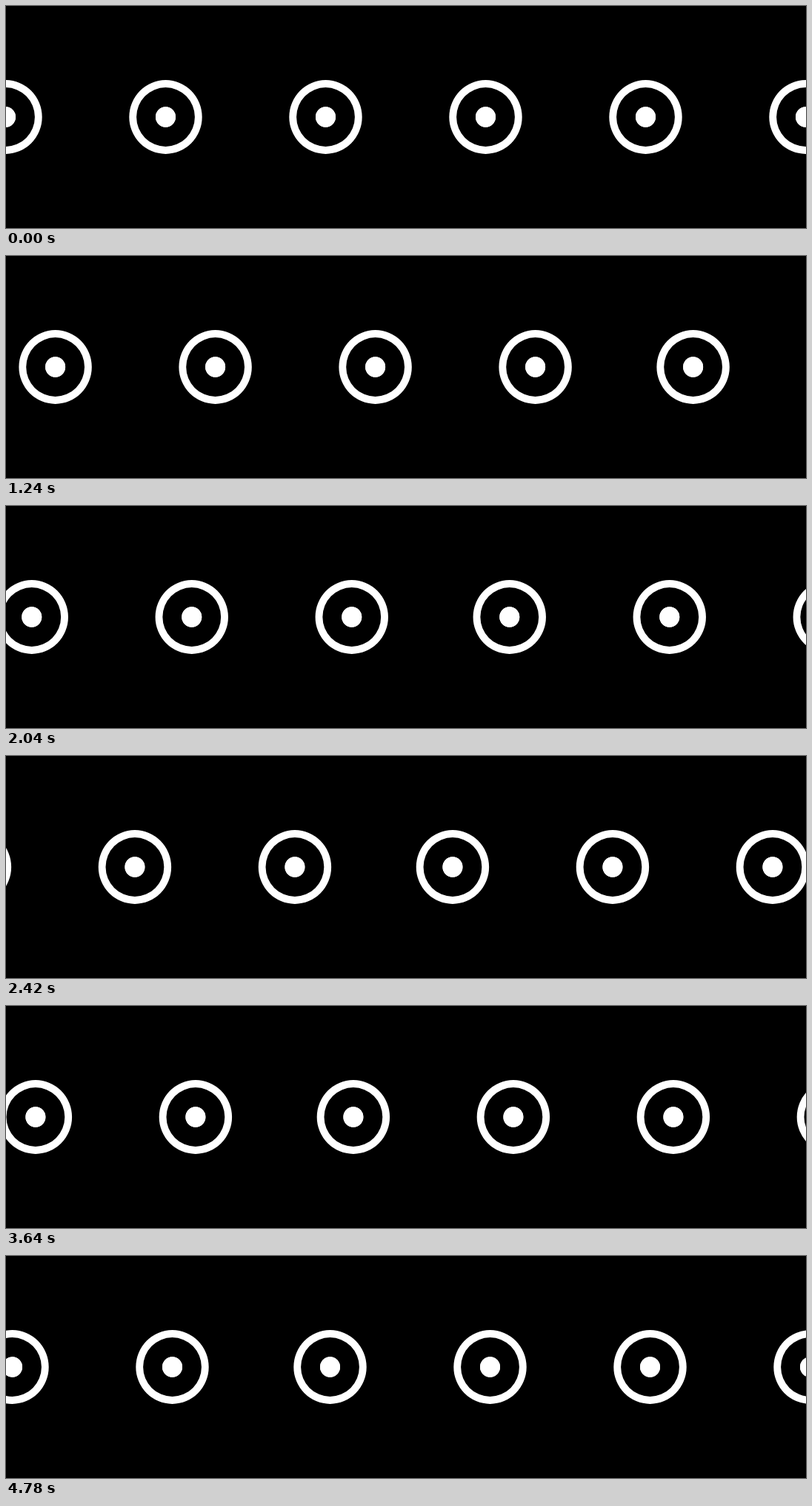
An HTML page with a canvas for the animation above (5440 ms loop, 1080 px wide and 300 px high).

```html
<!DOCTYPE html>
<html lang="en">
<head>
<meta charset="utf-8">
<title>Sliding rings</title>
<style>
  html, body { margin: 0; width: 100%; height: 100%; overflow: hidden; background: #000; }
  canvas { display: block; }
</style>
</head>
<body>
<canvas id="stage" width="1080" height="300"></canvas>
<script>
  const ctx = document.getElementById('stage').getContext('2d');
  const LOOP = 5440, SLIDE = 4800, STEP = 20;
  const START = -0.5, TRAVEL = 855;
  const GAP = 216, SEAM = 3, COUNT = 10, FIRST_STRIP = 6;
  const MID_Y = 150;

  // cubic-bezier(.25, .1, .25, 1)
  function ease(x) {
    if (x <= 0) return 0;
    if (x >= 1) return 1;
    let lo = 0, hi = 1;
    for (let i = 0; i < 40; i++) {
      const s = (lo + hi) / 2;
      if (0.75 * s * (1 - s) + s ** 3 < x) lo = s; else hi = s;
    }
    const s = lo, r = 1 - s;
    return 0.3 * s * r * r + 3 * s * s * r + s ** 3;
  }

  function oval(x, rx, ry) {
    ctx.moveTo(x + rx, MID_Y);
    ctx.ellipse(x, MID_Y, rx, ry, 0, 0, Math.PI * 2);
  }

  function ring(x) {
    ctx.beginPath();
    oval(x, 49.2, 49.9);
    oval(x, 39.4, 39.9);
    oval(x, 13.5, 13.7);
    ctx.fill('evenodd');
    ctx.beginPath();
    oval(x, 13.5, 13.7);
    ctx.fill();
  }

  function draw(time) {
    const t = Math.min(Math.floor((time % LOOP) / STEP) * STEP, SLIDE - STEP);
    const shift = START - TRAVEL * ease(t / SLIDE);
    ctx.fillStyle = '#000';
    ctx.fillRect(0, 0, 1080, 300);
    ctx.fillStyle = '#fff';
    for (let i = 0; i < COUNT; i++) {
      const x = i * GAP - (i < FIRST_STRIP ? 0 : SEAM) + shift;
      if (x > -50 && x < 1130) ring(x);
    }
  }

  let begin = null;
  function tick() {
    const now = performance.now();
    if (begin === null) begin = now;
    draw(now - begin);
    requestAnimationFrame(tick);
  }
  tick();
</script>
</body>
</html>
```
